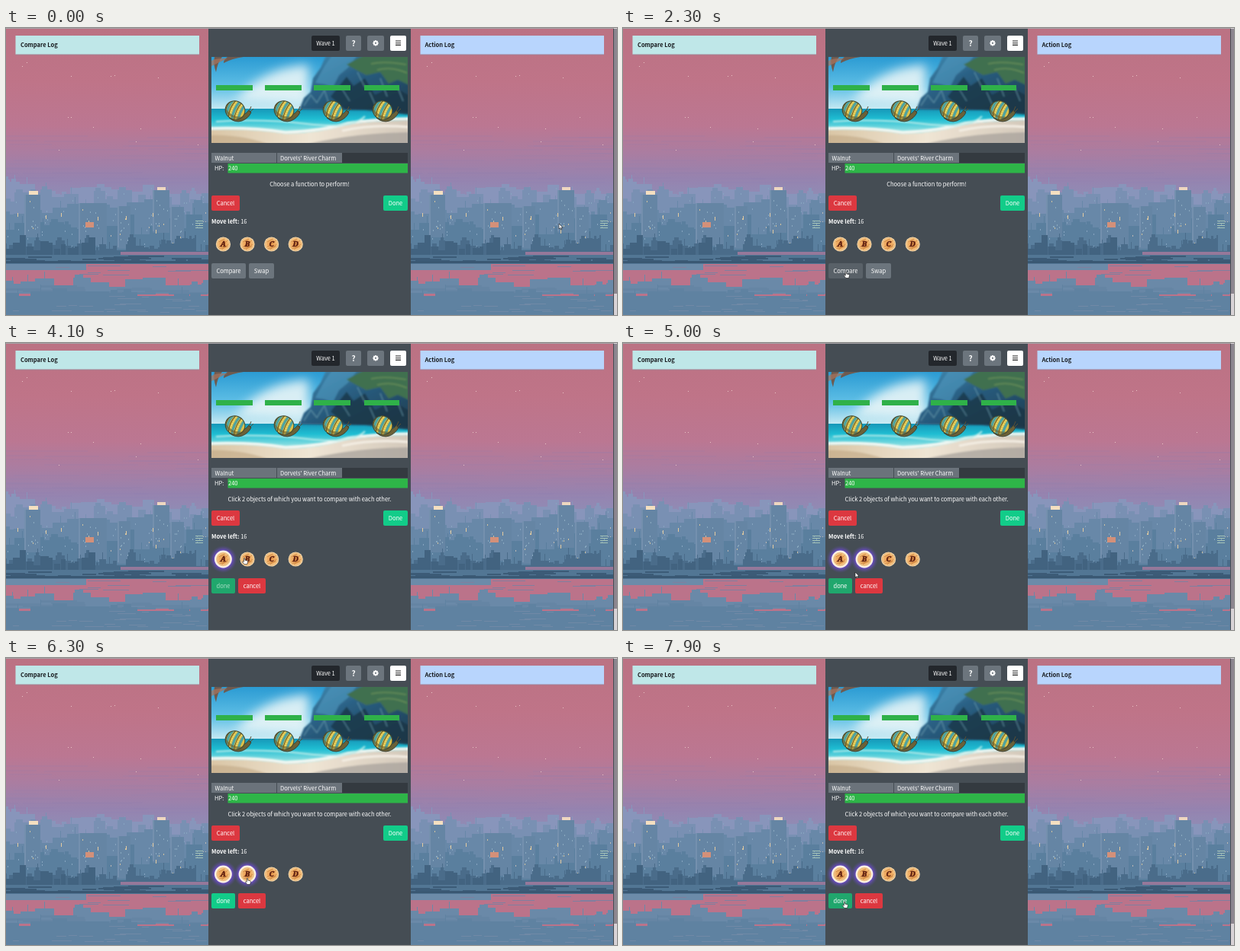
An HTML page with a canvas that plays this animation: 800 by 377 pixels, repeating every 8 s.

```html
<!DOCTYPE html>
<html lang="en">
<head>
<meta charset="utf-8">
<title>Compare game</title>
<style>
html, body { margin: 0; width: 100%; height: 100%; overflow: hidden; background: #454d54; }
canvas, svg { position: absolute; left: 0; top: 0; width: 800px; height: 377px; }
text { font: 7.5px "Noto Sans CJK JP", "Noto Sans CJK SC", "Noto Sans CJK", "Noto Sans", sans-serif; fill: #fff; }
.bold { font-weight: 700; }
.dark { fill: #16191c; }
.mid { text-anchor: middle; }
.coin text { font: italic 900 9.5px "Noto Serif", serif; fill: #5e1f10; stroke: #5e1f10; stroke-width: .5px; }
</style>
</head>
<body>
<canvas id="city" width="800" height="377"></canvas>
<svg id="ui" viewBox="0 0 800 377">
  <defs>
    <linearGradient id="sky" x2="0" y2="1">
      <stop offset="0" stop-color="#2b9bd3"/><stop offset=".35" stop-color="#5fbfe6"/>
      <stop offset=".6" stop-color="#c3e8f2"/>
    </linearGradient>
    <linearGradient id="sea" x2="0" y2="1">
      <stop offset="0" stop-color="#1697b8"/><stop offset=".3" stop-color="#1fbdd2"/>
      <stop offset=".65" stop-color="#8fe0e2"/>
    </linearGradient>
    <linearGradient id="rock" x2="1" y2="1">
      <stop offset="0" stop-color="#4390b8"/><stop offset=".4" stop-color="#2a5f83"/>
      <stop offset="1" stop-color="#1d3a4c"/>
    </linearGradient>
    <linearGradient id="sand" x2="1" y2="0">
      <stop offset="0" stop-color="#d9c5a4"/><stop offset=".5" stop-color="#efe5d4"/>
      <stop offset="1" stop-color="#d3c8ba"/>
    </linearGradient>
    <radialGradient id="gold">
      <stop offset="0" stop-color="#e9994c"/><stop offset=".7" stop-color="#f0b069"/>
      <stop offset="1" stop-color="#f8d397"/>
    </radialGradient>
    <radialGradient id="glow">
      <stop offset=".55" stop-color="#7a50ee"/><stop offset=".72" stop-color="#6a4cc8" stop-opacity=".65"/>
      <stop offset="1" stop-color="#5a4a9a" stop-opacity="0"/>
    </radialGradient>
    <filter id="soft"><feGaussianBlur stdDeviation="1.1"/></filter>
    <filter id="haze" x="-50%" y="-50%" width="200%" height="200%"><feGaussianBlur stdDeviation="7"/></filter>
    <clipPath id="frame"><path d="M269 38H526V151H269Z"/></clipPath>
    <clipPath id="shell"><ellipse rx="13" ry="12"/></clipPath>
    <g id="snail">
      <path d="M-11 9Q-3 16 6 13Q14 10 18 2L15-1Q12 4 6 5Z" fill="#6b6138" stroke="#33382c" stroke-width=".8"/>
      <path d="M15 1L18-6M16 2L21-3" stroke="#5a4f35"/>
      <g transform="translate(-3 -1) rotate(24)">
        <ellipse rx="13" ry="12" fill="#dcc04a"/>
        <g clip-path="url(#shell)" fill="none">
          <path d="M-7-13Q-12 0-7 13M1-13Q-3 0 1 13M9-12Q6 0 9 12" stroke="#4fa3a0" stroke-width="3.4"/>
          <path d="M-4-13Q-9 0-4 13M4-13Q0 0 4 13M-10-10Q-14 0-10 10" stroke="#5c4e28" stroke-width="1"/>
          <path d="M-2-13Q-6 0-2 13M6-13Q3 0 6 13" stroke="#f1e38a" stroke-dasharray="1.5 1.5"/>
          <path d="M-13 4Q0 13 13 5" stroke="#6e5f2a" stroke-width="3" opacity=".6"/>
        </g>
        <ellipse rx="13" ry="12" fill="none" stroke="#43482f"/>
      </g>
    </g>
  </defs>
</svg>
<script>
const ui = document.getElementById('ui');
const LOOP = 8000, STEP = 100;

// City backdrop, painted once and repeated on both sides
function paintCity() {
  const tile = document.createElement('canvas');
  tile.width = 265;
  tile.height = 377;
  const g = tile.getContext('2d');
  let seed = 41;
  const rnd = () => (seed = (seed * 16807) % 2147483647) / 2147483647;
  const between = (a, b) => Math.floor(a + rnd() * (b - a));
  const box = (color, x, y, w, h) => { g.fillStyle = color; g.fillRect(x, y, w, h); };

  const sky = g.createLinearGradient(0, 0, 0, 235);
  [[0, '#bb7283'], [.3, '#bf7488'], [.55, '#bb7792'], [.7, '#aa7da1'], [.84, '#9683af'], [1, '#8c91b8']]
    .forEach(([at, color]) => sky.addColorStop(at, color));
  box(sky, 0, 0, 265, 377);

  for (let y = 140; y < 205; y += 6) {
    for (let i = 0; i < 3; i++) box('rgba(140,120,175,.12)', between(-40, 240), y + between(0, 4), between(40, 150), 2);
  }
  [[21, 50], [27, 45], [85, 63], [81, 117], [85, 117], [114, 130], [137, 63], [142, 62],
   [170, 149], [176, 132], [199, 65], [221, 117], [251, 153], [69, 160]]
    .forEach(([x, y]) => box('#e8c3c4', x, y, 1, 1));

  function skyline(color, top, low, bottom, wMin, wMax, lit) {
    for (let x = -3; x < 265;) {
      const w = between(wMin, wMax), y = between(top, low);
      box(color, x, y, w, bottom - y);
      if (rnd() < .5) box(color, x + 2, y - 4, Math.max(2, w >> 1), 4);
      if (rnd() < .3) box(color, x + (w >> 1), y - 9, 1, 9);
      for (let wy = y + 4; wy < bottom - 8; wy += 4) {
        for (let wx = x + 2; wx < x + w - 1; wx += 3) {
          if (rnd() < lit) box(rnd() < .12 ? '#bdb9b4' : '#86a4bf', wx, wy, 1, 2);
        }
      }
      x += w - between(0, 2);
    }
  }
  skyline('#8895bb', 199, 220, 300, 8, 22, .02);
  skyline('#7990b3', 211, 235, 300, 9, 22, .05);
  skyline('#6888a8', 228, 250, 300, 10, 24, .07);
  skyline('#5a7f9e', 245, 272, 300, 9, 23, .07);

  [[24, 219, 21], [95, 230, 37], [146, 234, 17], [192, 213, 22], [215, 235, 18]].forEach(([x, y, w]) => {
    box('#6585a4', x, y, w, 56);
    box('#7490ae', x, y, 2, 54);
    for (let i = 0; i < 10; i++) box(i % 5 ? '#8aa9c0' : '#cfc2a0', x + between(3, w - 2), y + between(7, 48), 1, 2);
  });
  box('#f4dfc0', 30, 214, 12, 5);
  box('#eed7c0', 198, 209, 11, 4);
  box('#d49079', 104, 255, 11, 7);
  for (let y = 253; y < 264; y += 3) box('#a6c4b7', 248, y, 10, 1);
  [[15, 243], [72, 243], [52, 246], [120, 248], [192, 243], [196, 265], [157, 247]]
    .forEach(([x, y]) => box('#e3cba0', x, y, 1, 5));

  skyline('#4a6c8a', 275, 294, 305, 4, 14, .02);
  for (let x = 0; x < 115; x += 9) {
    const h = between(10, 32);
    box('#426380', x, 302 - h, between(5, 13), h);
  }

  // Shore and water
  box('#96789a', 150, 294, 115, 4);
  box('#527694', 0, 298, 265, 12);
  for (let i = 0; i < 25; i++) box('#3c5b77', between(-10, 245), between(299, 307), between(10, 50), 2);
  box('#3a5873', 0, 306, 265, 3);
  box('#bb738a', 0, 310, 265, 67);
  box('#6c8ba9', 0, 310, 105, 8);
  for (let i = 0; i < 9; i++) box('#807f9f', between(60, 230), between(312, 325), between(12, 45), 1);
  skyline('#6a89a8', 328, 342, 349, 12, 34, 0);
  for (let i = 0; i < 14; i++) box('#6585a4', between(-10, 230), between(338, 350), between(20, 60), 3);
  box('#5f82a1', 0, 352, 265, 25);
  skyline('#5f82a1', 346, 354, 377, 18, 40, 0);
  for (let i = 0; i < 24; i++) box('#7089a6', between(-5, 250), between(352, 374), between(6, 28), 1);

  const page = document.getElementById('city').getContext('2d');
  page.drawImage(tile, 0, 0);
  page.drawImage(tile, 530, 0);
}

const rect = (x, y, w, h, fill, r = 0, more = '') =>
  `<rect x="${x}" y="${y}" width="${w}" height="${h}" rx="${r}" fill="${fill}" ${more}/>`;
const label = (x, y, str, cls = '') => `<text x="${x}" y="${y}" class="${cls}">${str}</text>`;
const button = (id, x, y, w, fill, str) =>
  `<g id="${id}">${rect(x, y, w, 20, fill, 2)}${label(x + w / 2, y + 12.7, str, 'mid')}</g>`;
const path = (d, fill, more = '') => `<path d="${d}" fill="${fill}" ${more}/>`;

function beach() {
  const slots = [[275, 48, 303], [339, 48, 367], [403, 48, 431], [469, 46, 496]];
  return `<g clip-path="url(#frame)">
    ${rect(269, 38, 257, 113, 'url(#sky)')}
    ${path('M300 96Q335 52 396 48V100Z', '#f0f8f8', 'filter="url(#haze)" opacity=".85"')}
    ${rect(269, 106, 257, 45, 'url(#sea)')}
    <g filter="url(#soft)">
      ${path('M384 107L390 92L399 84L402 66L412 52L419 36H530V114L470 108Z', 'url(#rock)')}
      ${path('M405 72L417 50L427 36H460L448 52L436 62L428 78L417 74Z', '#4d97bd', 'opacity=".65"')}
      ${path('M446 48L468 36H530V76L513 68L501 73L490 58L472 62L460 56Z', '#41704f')}
      ${path('M425 90L446 64L455 76L470 66L483 88L506 76L530 90V110L487 107L444 107Z', '#1b3445', 'opacity=".75"')}
      ${path('M390 102L399 88L407 98L417 82L424 103M460 58L470 78M490 66L499 90M440 80L450 96M476 84L484 102M512 76L520 96',
        'none', 'stroke="#6fa3b5" stroke-width="1.4" opacity=".6"')}
      ${path('M478 47Q495 43 524 48M486 55Q505 50 525 59', 'none', 'stroke="#72975a" stroke-width="2" opacity=".6"')}
      ${path('M265 134Q320 132 366 139Q412 138 446 127Q482 121 530 121V155H265Z', 'url(#sand)')}
      ${path('M265 132Q321 130 366 137Q414 135 448 125Q485 119 530 119', 'none', 'stroke="#f4f8f3" stroke-width="3.5"')}
      ${path('M275 123Q335 119 394 126T470 116', 'none', 'stroke="#b6ebe9" stroke-width="2"')}
      ${path('M265 141Q310 139 350 155H265Z', '#c2a885', 'opacity=".6"')}
      ${path('M385 155Q450 138 530 137V155Z', '#a5a09b', 'opacity=".7"')}
      ${path('M440 135Q480 126 526 130', 'none', 'stroke="#f3ede3" stroke-width="3"')}
    </g>
    ${path('M273 38H283Q277 45 275 58Q271 47 273 38ZM290 38H311Q296 40 285 46Q285 41 290 38Z', '#6e5b50')}
    ${path('M269 43Q277 39 290 40L269 50Z', '#a9745c', 'opacity=".7"')}
    ${slots.map(([x, w, cx]) => rect(x, 75, w, 7, '#2fb149') + `<use href="#snail" x="${cx}" y="109"/>`).join('')}
  </g>`;
}

const coins = [...'ABCD'].map((letter, i) => ({ letter, x: 284.4 + i * 31.6, y: 284 }));
const coinArt = ({ letter, x, y }) => `<g class="coin" transform="translate(${x} ${y})">
  <g class="halo"><circle r="18" fill="url(#glow)"/><circle r="11.4" fill="#fdf3e6"/></g>
  <circle r="9.6" fill="#f9dfb4"/><circle r="8.3" fill="url(#gold)" stroke="#dc9a55" stroke-width=".6"/>
  <path d="M-6 4L6-5M-5 6L6 3M-6-3L2-7M-2 7L7 0" stroke="#c9803c" stroke-width=".8"/>
  <text class="mid" y="3.4">${letter}</text></g>`;

function buildUi() {
  const spokes = [0, 45, 90, 135].map(a => `<path d="M-3.7 0H3.7" transform="rotate(${a})"/>`).join('');
  ui.insertAdjacentHTML('beforeend', `
    ${rect(265, 0, 265, 377, '#454d54')}
    ${rect(0, 0, 800, 1, '#a5a2a6')}
    ${rect(796, 0, 4, 377, '#d8d3d6')}${rect(796, 1, 4, 348, '#8c868f')}
    ${rect(12.5, 10, 240.5, 24.7, '#bfe7e8')}${rect(12.5, 34.7, 240.5, .6, '#8f8f9c')}
    ${rect(542.5, 10, 240.5, 24.7, '#b8d5fd')}${rect(542.5, 34.7, 240.5, .6, '#8f8ca4')}
    ${label(19, 25, 'Compare Log', 'bold dark')}${label(548.5, 25, 'Action Log', 'bold dark')}
    ${button('wave', 400, 10, 37, '#23272c', 'Wave 1')}
    ${rect(445, 10, 20, 20, '#6c757d', 2)}<text x="455" y="23.5" class="mid bold" style="font-size:10px">?</text>
    ${rect(473, 10, 22, 20, '#6c757d', 2)}
    <g transform="translate(484 19.8)" stroke="#fff" stroke-width="1.7">${spokes}<circle r="2" fill="#6c757d"/></g>
    ${rect(503, 10, 21, 20, '#fff', 2)}<path d="M510 17H517M510 19.7H517M510 22.4H517" stroke="#222" stroke-width="1.1"/>
    ${beach()}
    ${rect(269, 164, 257, 13, '#343a40')}${rect(269, 164, 171, 13, '#6b737b')}
    ${rect(354, 164, .8, 13, '#3d444b')}
    ${label(273.5, 173.7, 'Walnut')}${label(359, 173.7, "Dorvels' River Charm")}
    ${label(273, 186.7, 'HP:')}${rect(290.5, 178, 235.5, 12.5, '#2eb548')}${label(291, 186.8, '240')}
    <text id="prompt" class="mid" x="397.5" y="208"></text>
    ${button('stop', 269, 220, 37, '#dc3840', 'Cancel')}${button('finish', 494, 220, 32, '#12cc89', 'Done')}
    <text x="269" y="257"><tspan class="bold">Move left:</tspan> 16</text>
    ${coins.map(coinArt).join('')}
    <g id="menu">${button('compare', 269, 309, 45, '#6c757d', 'Compare')}${button('swap', 318, 309, 33, '#6c757d', 'Swap')}</g>
    <g id="pick">${button('done', 269, 309, 31, '#12cc89', 'done')}${button('cancel', 304, 309, 36, '#dc3840', 'cancel')}</g>
    <g id="cursor" stroke="#111" stroke-width=".6" stroke-linejoin="round">
      <path id="arrow" fill="#fff" d="M0 0V7L1.6 5.6L2.7 8L3.8 7.5L2.8 5.2H5Z"/>
      <path id="hand" fill="#fff" d="M-.7.6Q0-.4.7.6V3L4 3.8Q4.7 4.2 4.4 5.5L3.6 8.5H-.1L-2.8 5.3Q-2.5 4-.7 5.2Z"/>
    </g>`);
}

// time, x, y of the pointer tip
const track = [
  [0, 724, 257], [200, 721, 261], [1200, 582.5, 347.5], [1400, 552, 350], [2000, 298, 321],
  [2300, 292, 320], [2700, 292, 320], [3200, 285, 283], [3600, 285, 283], [4000, 312, 282],
  [4400, 313, 283], [4700, 292, 318], [4900, 294, 315], [5000, 304, 301], [5300, 315, 288],
  [6300, 316, 289], [6600, 316, 289], [7100, 290, 320], [8000, 290, 320]
];
const OPEN = 2700, PICKS = [3500, 4300];

function pointer(t) {
  const i = track.findIndex(k => k[0] > t);
  const [t0, x0, y0] = track[i - 1], [t1, x1, y1] = track[i];
  const p = (t - t0) / (t1 - t0), e = p * p * (3 - 2 * p);
  return [x0 + (x1 - x0) * e, y0 + (y1 - y0) * e];
}

const el = id => document.getElementById(id);
const show = (node, on) => node.setAttribute('visibility', on ? 'visible' : 'hidden');
const paint = (id, color) => el(id).firstElementChild.setAttribute('fill', color);

function draw(t) {
  const [x, y] = pointer(t);
  const over = (left, w) => x >= left && x <= left + w && y >= 309 && y <= 329;
  const open = t >= OPEN, ready = t >= PICKS[1];
  const overDone = open && over(269, 31);
  const overCoin = open && coins.some(c => Math.hypot(c.x - x, c.y - y) < 11);
  const overCompare = !open && over(269, 45), overSwap = !open && over(318, 33);
  const hand = (overDone && ready) || overCoin || overCompare || overSwap;

  el('prompt').textContent = open
    ? 'Click 2 objects of which you want to compare with each other.'
    : 'Choose a function to perform!';
  show(el('menu'), !open);
  show(el('pick'), open);
  paint('compare', overCompare ? '#596168' : '#6c757d');
  paint('swap', overSwap ? '#596168' : '#6c757d');
  paint('done', !ready || overDone || t < 5100 ? '#20a76d' : '#12cc89');
  el('done').lastElementChild.setAttribute('opacity', ready ? 1 : .6);

  document.querySelectorAll('.coin .halo').forEach((halo, i) => show(halo, t >= PICKS[i]));
  el('cursor').setAttribute('transform', `translate(${x} ${y})`);
  show(el('arrow'), !hand);
  show(el('hand'), hand);
}

paintCity();
buildUi();
const start = performance.now();
function tick() {
  const t = (performance.now() - start) % LOOP;
  draw(Math.floor(t / STEP) * STEP);
  requestAnimationFrame(tick);
}
tick();
</script>
</body>
</html>
```
